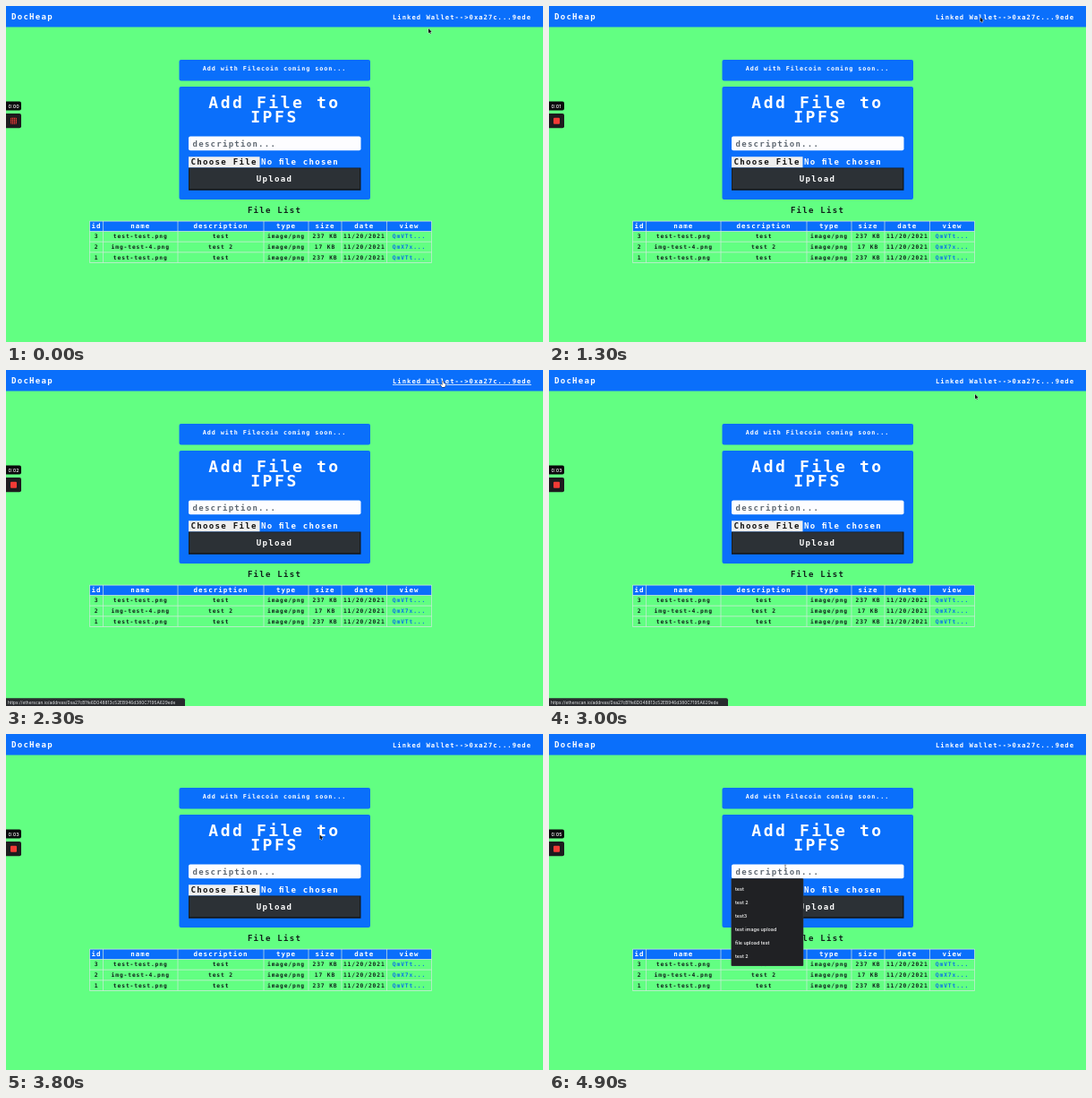
These frames come from a looping animation (600x375 px, 5000 ms). An HTML page with a canvas:

```html
<!DOCTYPE html>
<html lang="en">
<head>
<meta charset="utf-8">
<title>DocHeap</title>
<style>
  html, body { margin: 0; width: 100%; height: 100%; overflow: hidden; background: #62ff82; }
  canvas { display: block; width: 600px; height: 375px; }
</style>
</head>
<body>
<canvas id="stage"></canvas>
<script>
const W = 600, H = 375, LOOP = 5000, STEP = 100;
const BLUE = '#0a6ffb', GREEN = '#62ff82', WHITE = '#fff', INK = '#10201a';
const MONO = '"DejaVu Sans Mono", monospace';
const SANS = 'Inter, sans-serif';
const ADVANCE = 0.602, TRACKING = 0.14;

const canvas = document.getElementById('stage');
const ctx = canvas.getContext('2d');
const dpr = window.devicePixelRatio || 1;
canvas.width = W * dpr;
canvas.height = H * dpr;

const clamp = v => Math.max(0, Math.min(1, v));
const ease = v => v * v * (3 - 2 * v);

function box(x, y, w, h, color, r = 0) {
  ctx.fillStyle = color;
  ctx.beginPath();
  ctx.roundRect(x, y, w, h, r);
  ctx.fill();
}

// Wide monospaced text; y is the middle of the capitals, cell the width of one character.
function mono(str, x, y, cell, color = WHITE, align = 'left') {
  const size = cell / (ADVANCE + TRACKING);
  ctx.font = `bold ${size}px ${MONO}`;
  ctx.letterSpacing = `${size * TRACKING}px`;
  ctx.textAlign = align;
  ctx.fillStyle = color;
  ctx.fillText(str, x, y + size * 0.365);
}

function sans(str, x, y, size, color = WHITE, weight = 500) {
  ctx.font = `${weight} ${size}px ${SANS}`;
  ctx.letterSpacing = '0px';
  ctx.textAlign = 'left';
  ctx.fillStyle = color;
  ctx.fillText(str, x, y + size * 0.365);
}

function header(hover) {
  box(0, 0, W, 23.5, BLUE);
  mono('DocHeap', 6, 11.8, 6.7);
  mono('Linked Wallet-->0xa27c...9ede', 432, 12.4, 5.35);
  if (hover) box(432, 16, 155, 0.8, WHITE);
}

function form(caret) {
  box(193.5, 60, 213.5, 23.5, BLUE, 2);
  mono('Add with Filecoin coming soon...', 300, 70, 5.03, WHITE, 'center');

  box(193.5, 90, 213.5, 126, BLUE, 2);
  mono('Add File to', 300, 107.7, 13.4, WHITE, 'center');
  mono('IPFS', 300, 123.9, 13.4, WHITE, 'center');

  box(204, 145.5, 192.5, 15.7, '#fdfdff', 2);
  mono('description...', 208.5, 153.3, 6.7, '#5f6872');
  if (caret) box(208.6, 149, 0.8, 8, '#222');

  box(204, 168.2, 79.5, 12.3, '#efefef');
  mono('Choose File', 206.5, 174, 6.75, '#111');
  mono('No \uFB01le chosen', 285, 174, 6.7);

  box(204, 180.5, 192.5, 25.2, '#15181b');
  box(204.8, 181.3, 190.4, 22.8, '#2c3136');
  mono('Upload', 300, 193, 6.75, WHITE, 'center');
}

const COLS = [93.5, 108.5, 192, 288, 338, 375, 425.5, 475.5];
const HEADS = ['id', 'name', 'description', 'type', 'size', 'date', 'view'];
const ROWS = [
  ['3', 'test-test.png', 'test', '237 KB', 'QmVTt...'],
  ['2', 'img-test-4.png', 'test 2', '17 KB', 'QmX7x...'],
  ['1', 'test-test.png', 'test', '237 KB', 'QmVTt...']
].map(([id, name, note, size, link]) => [id, name, note, 'image/png', size, '11/20/2021', link]);
const ROW_TOP = 251.6, ROW_H = 11.6;

function table() {
  mono('File List', 300, 227.5, 6.7, INK, 'center');
  box(93.5, 240, 382, ROW_TOP - 240, BLUE);
  const mid = i => (COLS[i] + COLS[i + 1]) / 2;
  HEADS.forEach((s, i) => mono(s, mid(i), 245.3, 5.55, WHITE, 'center'));
  ROWS.forEach((row, r) => row.forEach((s, i) =>
    mono(s, mid(i), 257.1 + r * ROW_H, 4.68, i === 6 ? '#0a6fe8' : INK, 'center')));

  const bottom = ROW_TOP + ROWS.length * ROW_H;
  for (const x of COLS) box(x - 0.35, 240, 0.7, bottom - 240, '#cfe9dc');
  box(93.5, 239.7, 382, 0.7, '#cfe9dc');
  for (let r = 0; r <= ROWS.length; r++) {
    box(93.5, ROW_TOP + r * ROW_H - 0.35, 382, 0.7, '#cfe9dc');
  }
}

function recorder(t) {
  box(0, 106.5, 17, 10, '#0a0a0c', [0, 2, 2, 0]);
  sans('0:0' + Math.floor((t + 100) / 1000), 2.6, 111.6, 5.4);
  box(0, 120, 17, 16.2, '#1d1b1e', [0, 2, 2, 0]);
  box(5, 124.8, 7, 7, '#f23b36', 1);
  ctx.globalAlpha = 0.75 * (1 - clamp(t / 400));
  for (let i = 0; i < 3; i++) {
    box(6.1 + i * 2, 124.8, 0.9, 7, '#1d1b1e');
    box(5, 126 + i * 2, 7, 0.6, '#1d1b1e');
  }
  ctx.globalAlpha = 1;
}

const URL_TEXT = 'https://etherscan.io/address/0xa27cB1fe6D048813c52EB946d380C7195A629ede';

function statusBar(t) {
  ctx.globalAlpha = clamp((t - 1800) / 200) * clamp((3500 - t) / 200);
  if (ctx.globalAlpha > 0) {
    box(0, 366.3, 200, 8.7, '#292b2e', [0, 2, 0, 0]);
    sans(URL_TEXT, 2, 371, 4.85, '#e4e6e8', 400);
  }
  ctx.globalAlpha = 1;
}

const HINTS = ['test', 'test 2', 'test3', 'test image upload', 'file upload test', 'test 2'];

function suggestions() {
  box(203.5, 161.3, 80.8, 97.6, '#3a3c40', 1);
  box(204, 161.6, 79.8, 96.9, '#202124', 1);
  HINTS.forEach((s, i) => sans(s, 208, 173 + i * 14.95, 5.45));
}

// [time, x, y] of the pointer's hot spot
const PATH = [
  [0, 472, 25], [500, 474.5, 12.5], [900, 475, 12.5], [1700, 488.5, 12.5],
  [2600, 488, 12.5], [3000, 476, 27], [3400, 437, 75.5], [4200, 264, 149], [5000, 264, 149]
];

function pointerAt(t) {
  const i = PATH.findIndex((p, n) => n && t <= p[0]);
  const [t0, x0, y0] = PATH[i - 1], [t1, x1, y1] = PATH[i];
  const k = ease((t - t0) / (t1 - t0));
  return [x0 + (x1 - x0) * k, y0 + (y1 - y0) * k];
}

function polygon(points, fill, stroke) {
  ctx.beginPath();
  points.forEach(([x, y]) => ctx.lineTo(x, y));
  ctx.closePath();
  ctx.lineJoin = 'round';
  ctx.lineWidth = 0.8;
  ctx.strokeStyle = stroke;
  ctx.stroke();
  ctx.fillStyle = fill;
  ctx.fill();
}

const ARROW = [[0, 0], [0, 5.2], [1.2, 4.2], [2, 6], [2.9, 5.6], [2.1, 3.9], [3.7, 3.8]];
const HAND = [[-0.5, 0], [0.5, 0], [0.6, 2.2], [2.9, 2.9], [2.8, 5], [2.1, 6.6],
              [-0.8, 6.6], [-2.4, 4.2], [-1.9, 3.6], [-0.6, 4.5]];

function pointer(t, hover) {
  const [x, y] = pointerAt(t);
  ctx.save();
  ctx.translate(x, y);
  const inField = x > 204 && x < 396 && y > 145.5 && y < 161;
  if (inField) {
    box(-0.3, -3, 0.6, 6, '#444');
    box(-1.2, -3.2, 2.4, 0.5, '#666');
    box(-1.2, 2.7, 2.4, 0.5, '#666');
  } else if (hover) {
    polygon(HAND, WHITE, '#222');
  } else {
    polygon(ARROW, '#111', '#e8f2f2');
  }
  ctx.restore();
}

function draw(t) {
  const hover = t >= 1400 && t < 3000;
  const caret = t >= 2000 && (t - 330) % 990 < 470;
  ctx.setTransform(dpr, 0, 0, dpr, 0, 0);
  box(0, 0, W, H, GREEN);
  header(hover);
  form(caret);
  table();
  recorder(t);
  statusBar(t);
  if (t >= 4500) suggestions();
  pointer(t, hover);
}

function tick() {
  const t = performance.now() % LOOP;
  draw(Math.floor(t / STEP) * STEP);
  requestAnimationFrame(tick);
}
tick();
</script>
</body>
</html>
```
